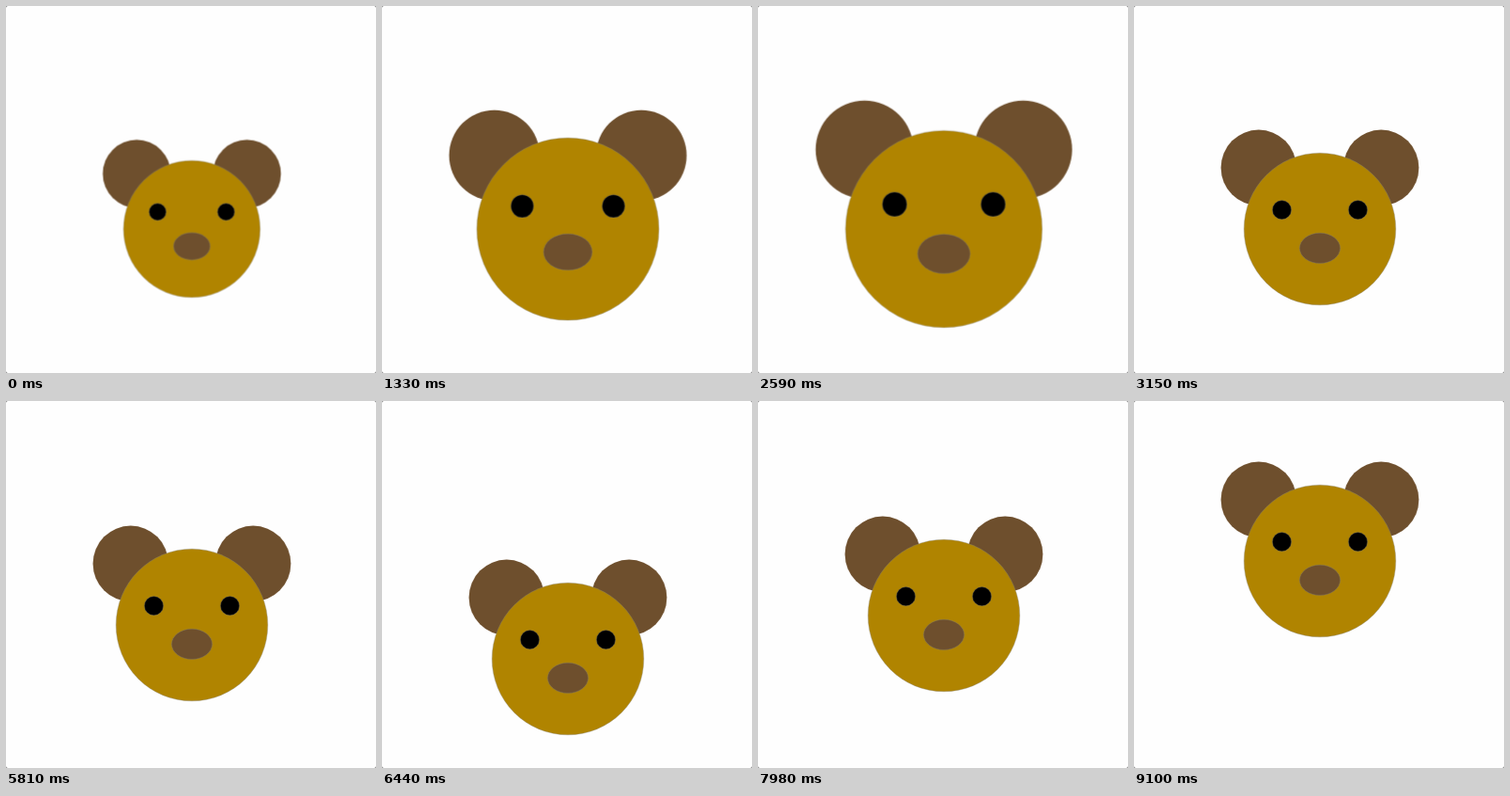
Write an HTML page without scripts that moves like this. It is 394 by 390 pixels and loops after 9380 ms.

```html
<!DOCTYPE html>
<html lang="en">
<head>
<meta charset="utf-8">
<title>Bear</title>
<style>
  html, body { margin: 0; width: 100%; height: 100%; overflow: hidden; background: #666; }
  svg { display: block; width: 394px; height: 390px; }
  .move, .size { animation: 9380ms -5ms infinite; transform-origin: 0 0; }
  .move { animation-name: move; }
  .size { animation-name: size; }
  .ear, .nose { fill: #6e4f2d; }
  .head { fill: #b08400; }
  .line { stroke: #808080; stroke-opacity: .45; stroke-width: .8; vector-effect: non-scaling-stroke; }

  /* One tick is 70 ms; the loop has 134 ticks. */
  @keyframes size {
    0%, .7463% { transform: scale(.9); animation-timing-function: steps(2); }
    2.2388%, 2.9851% { transform: scale(.89); animation-timing-function: steps(5); }
    6.7164% { transform: scale(.945); animation-timing-function: steps(21); }
    22.3881%, 23.8806% { transform: scale(1.48); animation-timing-function: steps(13); }
    33.5821%, 100% { transform: scale(1); }
  }
  @keyframes move {
    0%, 61.194% { transform: translate(197.9px, 237px); animation-timing-function: steps(1); }
    61.9403% { transform: translate(197.9px, 238px); animation-timing-function: steps(11); }
    70.1493% { transform: translate(197.9px, 282px); animation-timing-function: steps(2); }
    71.6418% { transform: translate(197.9px, 284.6px); animation-timing-function: steps(2); }
    73.1343%, 75.3731% { transform: translate(197.9px, 285px); animation-timing-function: steps(3); }
    77.6119% { transform: translate(197.9px, 276px); animation-timing-function: steps(10); }
    85.0746% { transform: translate(197.9px, 228px); animation-timing-function: steps(15); }
    96.2687% { transform: translate(197.9px, 171.5px); animation-timing-function: steps(1); }
    97.0149%, 100% { transform: translate(197.9px, 170px); }
  }
</style>
</head>
<body>
<svg viewBox="0 0 394 390">
  <rect width="394" height="390" rx="2" fill="#fefefe"/>
  <g class="move">
    <g class="size">
      <circle class="ear" cx="-65.2" cy="-65.2" r="40.2"/>
      <circle class="ear" cx="65.2" cy="-65.2" r="40.2"/>
      <circle class="head line" r="80.8"/>
      <circle class="line" cx="-40.5" cy="-20.3" r="10.1"/>
      <circle class="line" cx="40.5" cy="-20.3" r="10.1"/>
      <ellipse class="nose line" cy="20.3" rx="21.6" ry="16.1"/>
    </g>
  </g>
</svg>
</body>
</html>
```
